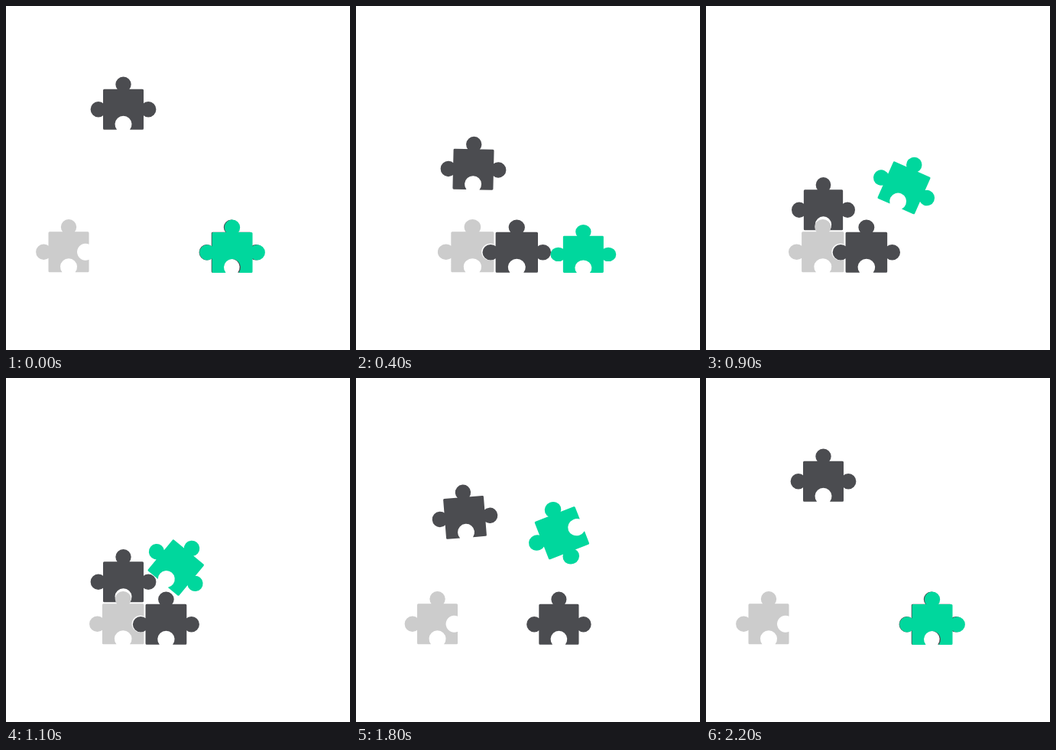
Write an HTML page that moves like this. It is 450 px wide and 450 px high and loops after 2.3 s.

```html
<!DOCTYPE html>
<html lang="en">
<head>
<meta charset="utf-8">
<title>Puzzle pieces</title>
<style>
  html, body { margin: 0; width: 100%; height: 100%; overflow: hidden; background: #fff; }
  svg { display: block; width: 100vw; height: 100vh; }
</style>
</head>
<body>
<svg id="stage" viewBox="0 0 450 450"></svg>
<script>
const STEP = 100, LOOP = 2300;
const HALF = 26.5, KNOB = 10.2, KNOB_AT = 32.7, NOTCH = 11;
const DARK = "#4b4c50", LIGHT = "#cccccc", GREEN = "#00d79d";

const circle = (x, y) =>
  `M${x - KNOB} ${y}a${KNOB} ${KNOB} 0 1 1 ${2 * KNOB} 0a${KNOB} ${KNOB} 0 1 1 ${-2 * KNOB} 0z`;

// Half the opening of a notch whose centre lies `at` from the middle.
const mouth = at => Math.sqrt(NOTCH ** 2 - (HALF - at) ** 2);

// A square body with a notch below, knobs above and left, and a knob or notch right.
function outline(notchRight) {
  const c = 1.5, e = HALF - c, arc = `A${NOTCH} ${NOTCH} 0 1 0 `;
  const low = mouth(19.5), side = mouth(22);
  const right = notchRight ? `V${-side}${arc}${HALF} ${side}` : "";
  return `M${-e} ${-HALF}H${e}Q${HALF} ${-HALF} ${HALF} ${-e}${right}V${e}` +
    `Q${HALF} ${HALF} ${e} ${HALF}H${low}${arc}${-low} ${HALF}H${-e}` +
    `Q${-HALF} ${HALF} ${-HALF} ${e}V${-e}Q${-HALF} ${-HALF} ${-e} ${-HALF}z` +
    circle(0, -KNOB_AT) + circle(-KNOB_AT, 0) + (notchRight ? "" : circle(KNOB_AT, 0));
}

// Timing helpers; s is the time in steps.
const ramp = (s, a, b) => Math.min(1, Math.max(0, (s - a) / (b - a)));
const smooth = (s, a, b) => { const p = ramp(s, a, b); return p * p * (3 - 2 * p); };
const hump = (s, a, b) => Math.sin(Math.PI * ramp(s, a, b));
const arch = p => 4 * p * (1 - p);

// How far the two lower pieces are joined, and how much they are stretched.
const joined = s => smooth(s, 0, 3.12) - smooth(s, 14.9, 20);
const strain = s => smooth(s, 2, 4) * ramp(s, 15, 7);

// Free fall to the pile, then the same flight upwards.
function topPose(s) {
  const fall = Math.min(s, Math.max(0, 21.1 - s));
  const sway = hump(s, 14, 22);
  return {
    x: 153.5 - 11 * sway ** 2,
    y: Math.min(266.8, 135.3 + 4.9 * fall ** 2),
    turn: 2.2 * hump(s, 0, 5) - 4.5 * sway,
    sx: 1 - 0.06 * hump(s, 4.5, 10)
  };
}

const leftPose = s => ({
  x: 82 + 72 * joined(s) - 1.6 * strain(s), y: 321.8, sx: 1 + 0.06 * strain(s)
});

const rightPose = s => ({
  x: 294.8 - 86.3 * joined(s) + 1.8 * strain(s), y: 322.3, sx: 0.985 + 0.06 * strain(s)
});

// Crouch, hop onto the pile, settle, then roll back in a higher hop.
function greenPose(s) {
  const up = ramp(s, 6.9, 11.15), back = ramp(s, 15, 19.6);
  const crouch = 0.1 * hump(s, 0, 6.5) + 0.06 * hump(s, 19.6, 22);
  const settle = 0.14 * (ramp(s, 11, 13) - ramp(s, 15, 16));
  return {
    x: 296 + 1.5 * hump(s, 0, 11) - 76.5 * (up - back),
    y: 322.4 - 70 * (up - back) - 50 * arch(up) - 105 * arch(back) + HALF * crouch,
    turn: 40 * smooth(s, 6, 11.3) + 320 * back,
    sy: 1 - crouch - settle + 0.08 * hump(s, 15, 19.6)
  };
}

const stage = document.getElementById("stage");

function piece(color, pose, notchRight = false) {
  const el = document.createElementNS("http://www.w3.org/2000/svg", "path");
  el.setAttribute("d", outline(notchRight));
  el.setAttribute("fill", color);
  stage.append(el);
  return { el, pose };
}

const pieces = [
  piece(DARK, topPose),
  piece(LIGHT, leftPose, true),
  piece(DARK, rightPose),
  piece(GREEN, greenPose)
];

function draw(time) {
  const s = Math.floor((time % LOOP) / STEP);
  for (const { el, pose } of pieces) {
    const { x, y, turn = 0, sx = 1, sy = 1 } = pose(s);
    el.setAttribute("transform", `translate(${x} ${y}) rotate(${turn}) scale(${sx} ${sy})`);
  }
}

let start;
function tick(now) {
  start ??= now;
  draw(now - start);
  requestAnimationFrame(tick);
}
draw(0);
requestAnimationFrame(tick);
</script>
</body>
</html>
```
